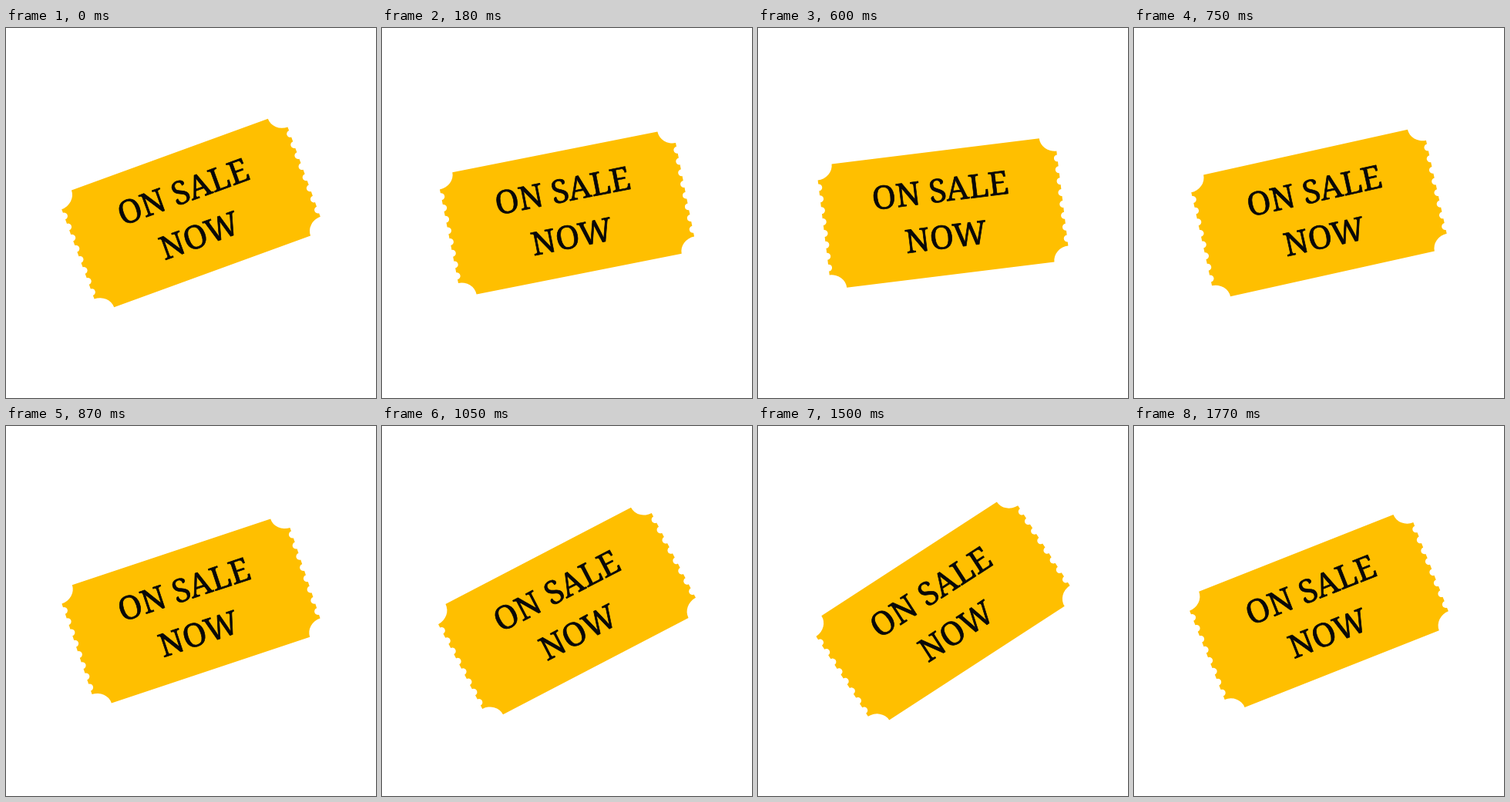
Animation of 480x480 px, one loop 1800 ms. Source, as an HTML page with a canvas:

```html
<!DOCTYPE html>
<html lang="en">
<head>
<meta charset="utf-8">
<title>On sale now</title>
<style>
html, body { margin: 0; width: 100%; height: 100%; overflow: hidden; background: #fff; }
canvas { display: block; width: 480px; height: 480px; }
</style>
</head>
<body>
<canvas id="stage" width="480" height="480"></canvas>
<script>
const ctx = document.getElementById('stage').getContext('2d');
const LOOP = 1800, STEP = 30;
const HALF_W = 156, HALF_H = 80.7;
const NOTCH_X = 20.4, NOTCH_Y = 18.8;
const BITES = 8, PITCH = 15, BITE = 4.5;

// One half of the outline: top edge, right notches and perforation.
function addHalf(path, s) {
  const corner = (y, from, to) =>
    path.ellipse(s * HALF_W, s * y, NOTCH_X, NOTCH_Y, 0,
      from + (s < 0 ? Math.PI : 0), to + (s < 0 ? Math.PI : 0), true);
  corner(-HALF_H, Math.PI, Math.PI / 2);
  for (let i = 0; i < BITES; i++) {
    const y = (i - (BITES - 1) / 2) * PITCH;
    const turn = s < 0 ? Math.PI : 0;
    path.arc(s * HALF_W, s * y, BITE, turn - Math.PI / 2, turn + Math.PI / 2, true);
  }
  corner(HALF_H, -Math.PI / 2, -Math.PI);
}

const ticket = new Path2D();
addHalf(ticket, 1);
addHalf(ticket, -1);
ticket.closePath();

function label(text, baseline) {
  ctx.fillText(text, 0, baseline);
  ctx.strokeText(text, 0, baseline);
}

function draw(time) {
  const t = Math.floor((time % LOOP) / STEP) * STEP;
  const tilt = 20 - 15 * Math.sin(2 * Math.PI * t / LOOP);
  ctx.setTransform(1, 0, 0, 1, 0, 0);
  ctx.fillStyle = '#fff';
  ctx.fillRect(0, 0, 480, 480);
  ctx.translate(240, 240);
  ctx.rotate(-tilt * Math.PI / 180);
  ctx.fillStyle = '#ffbf00';
  ctx.fill(ticket);
  ctx.fillStyle = ctx.strokeStyle = '#080808';
  ctx.lineWidth = 0.7;
  ctx.lineJoin = 'round';
  ctx.textAlign = 'center';
  ctx.font = '42px "Noto Serif", serif';
  label('ON SALE', -14.7);
  label('NOW', 46);
}

const start = performance.now();
function tick() {
  draw(performance.now() - start);
  requestAnimationFrame(tick);
}
tick();
</script>
</body>
</html>
```
